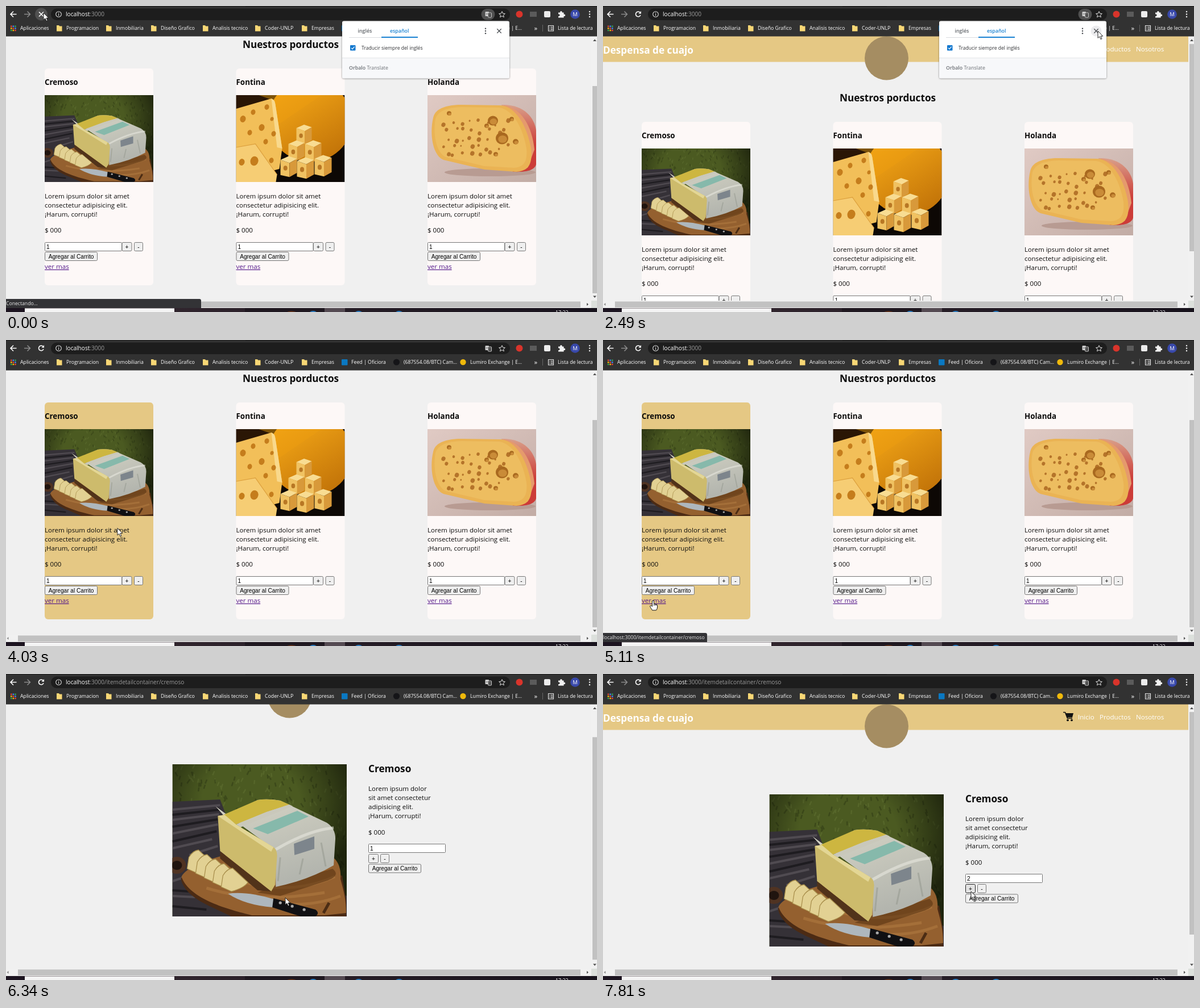
Write an HTML page that moves like this. It is 1039 px wide and 539 px high and loops after 8 s.

```html
<!DOCTYPE html>
<html lang="es">
<head>
<meta charset="utf-8">
<title>Tienda</title>
<style>
html, body { margin: 0; width: 100%; height: 100%; overflow: hidden; background: #f0f0f0; }
svg { display: block; width: 1039px; height: 539px; }
text { font-family: "Open Sans", "Noto Sans", sans-serif; white-space: pre; }
.form { font-family: "Liberation Sans", sans-serif; }
.bold { font-weight: 700; }
.semi { font-weight: 600; }
</style>
</head>
<body>
<svg id="stage" viewBox="0 0 1039 539" xmlns="http://www.w3.org/2000/svg"></svg>
<script>
const LOOP = 8000, TAN = '#e5c884', CARD = '#fdf8f7', INK = '#0c0c0c';
const CARD_X = [68, 404.5, 741];

// ---------- drawing helpers ----------
const rect = (x, y, w, h, fill, more = '') =>
  `<rect x="${x}" y="${y}" width="${w}" height="${h}" fill="${fill}" ${more}/>`;
const text = (x, y, s, size, fill = INK, more = '') =>
  `<text x="${x}" y="${y}" font-size="${size}" fill="${fill}" ${more}>${s}</text>`;
const path = (d, fill, more = '') => `<path d="${d}" fill="${fill}" ${more}/>`;
const line = (d, stroke, w = 1.4, more = '') =>
  `<path d="${d}" fill="none" stroke="${stroke}" stroke-width="${w}" ${more}/>`;
const dot = (x, y, r, fill, more = '') => `<circle cx="${x}" cy="${y}" r="${r}" fill="${fill}" ${more}/>`;
const oval = (x, y, rx, ry, fill, a = 0) =>
  `<ellipse cx="${x}" cy="${y}" rx="${rx}" ry="${ry}" fill="${fill}" transform="rotate(${a} ${x} ${y})"/>`;
const group = (id, body, more = '') => `<g id="${id}" ${more}>${body}</g>`;

function random(seed) {
  return () => (seed = (seed * 16807) % 2147483647) / 2147483647;
}

// ---------- pictures ----------
function creamCheese() {
  const rnd = random(11);
  const strokes = (n, x, y, w, h, dx, dy) => {
    let d = '';
    for (let i = 0; i < n; i++) {
      d += `M${(x + rnd() * w).toFixed(1)} ${(y + rnd() * h).toFixed(1)}l${(dx * (rnd() - .5)).toFixed(1)} ${dy}`;
    }
    return d;
  };
  const slices = [0, 1, 2, 3, 4].map(i => {
    const x = 26 + i * 15, y = 184 + i * 8;
    return path(`M${x} ${y}L${x + 3} ${y - 20}Q${x + 10} ${y - 32} ${x + 20} ${y - 33}L${x + 47} ${y - 8}Q${x + 40} ${y + 2} ${x + 18} ${y + 8}Z`,
      '#e2d193', 'stroke="#a98f4c" stroke-width="1.3" stroke-linejoin="round"');
  }).join('');
  return rect(0, 0, 307, 268, '#4b5a21') +
    line(strokes(160, 0, 0, 307, 190, 10, -7), '#6c7d3a', 2.4, 'opacity=".35"') +
    line(strokes(160, 0, 0, 307, 190, 10, -7), '#26300f', 2.6, 'opacity=".4"') +
    rect(0, 0, 307, 268, 'url(#vignette)') +
    path('M0 66L84 62 110 130 307 232V268H0Z', '#353137') +
    line('M0 80L84 72M0 98L82 88M0 122L80 106M0 148L70 132M30 160L80 144M0 206L18 200M0 232L40 234', '#676167', 4, 'opacity=".55"') +
    line('M0 89L84 80M0 110L80 97M0 136L78 118M0 222L30 224M0 250L60 256', '#151317', 4, 'opacity=".7"') +
    oval(8, 178, 16, 15, '#503322') + oval(8, 178, 9, 8, '#20140f') +
    path('M15 200C18 224 44 240 70 252L104 268H306V240L299 196Z', '#4c2b14') +
    path('M16 198C24 182 56 170 92 160L270 158C288 162 298 178 296 202C302 224 306 240 306 262L268 266H140C100 256 30 238 16 198Z', '#94602f') +
    line('M60 218Q150 246 268 226M120 206Q210 232 286 198M196 246Q250 250 296 232', '#b27c42', 5, 'opacity=".55"') +
    path('M150 226L180 214 282 184Q298 196 270 206L190 232Z', '#54310f', 'opacity=".55"') +
    path('M76 74L92 92 150 63Q168 60 190 64L272 103Q287 113 287 131L284 178Q240 204 182 216V152Z', 'url(#wrap)') +
    path('M90 89L150 63Q166 60 190 64L206 71 166 84 112 106Z', '#cdb640') +
    path('M112 106L166 84 206 71 212 74 172 90 120 111Z', '#c9c8bb') +
    path('M142 113L220 82 240 92 168 123Z', '#86b9ab') +
    line('M182 150Q240 116 284 112', '#e8e8df', 5, 'opacity=".6"') +
    line('M190 164L186 206M262 138L270 180M230 166L224 194', '#92968c', 3, 'opacity=".5"') +
    path('M214 140L250 127V149L215 160Z', '#7d858c') +
    path('M80 91L92 89 112 106 178 146Q186 152 184 166L181 212 174 224 84 153Z', '#cdbb6c') +
    path('M80 91L92 89 112 106 178 146 174 154Z', '#e3d695') +
    path('M84 153L174 224 150 222 84 166Z', '#51331a') + slices +
    path('M98 228Q130 223 180 238L177 252Q128 248 98 228Z', '#aeb7bd') +
    path('M178 236L252 256Q260 262 252 268H226L176 252Z', '#101013') +
    [190, 211, 232].map((x, i) => dot(x, 244 + i * 6, 2.6, '#a9a9a9')).join('') +
    line('M266 262L276 244', '#4b2c14', 5);
}

function fontina() {
  const cube = (x, y, s) =>
    path(`M${x} ${y}l${s * .5} -${s * .22} ${s * .5} ${s * .16} -${s * .45} ${s * .25}Z`, '#f8dc92') +
    path(`M${x} ${y}l${s * .55} ${s * .19}v${s * .85}l-${s * .55} -${s * .12}Z`, '#f0c262') +
    path(`M${x + s * .55} ${y + s * .19}l${s * .45} -${s * .25}v${s * .85}l-${s * .45} ${s * .25}Z`, '#d8993a') +
    oval(x + s * .3, y + s * .5, s * .12, s * .15, '#b87724');
  const holes = [[30, 30, 4], [54, 21, 4], [12, 42, 5], [63, 42, 3], [45, 57, 5], [66, 68, 4], [24, 66, 4], [52, 82, 4], [32, 116, 7], [10, 118, 5], [62, 115, 4]];
  return rect(0, 0, 191, 153, '#0d0805') + oval(130, 45, 74, 72, 'url(#wheel)', 12) +
    path('M40 0H150L62 60Z', '#ee9d10', 'opacity=".5"') +
    path('M0 0H40L62 8 0 24Z', '#2a1605') +
    path('M0 24L62 6Q68 8 69 16L81 94 76 130 0 150Z', '#f2bf59') +
    path('M62 6Q68 8 69 16L81 94 72 92Z', '#f9d98c') +
    path('M0 92L34 86 72 140 70 153H0Z', '#f6cd74') +
    line('M0 92L34 86 72 140', '#dc9f3c', 1.2) +
    holes.map(h => oval(h[0], h[1], h[2], h[2] * 1.2, '#c57d1c', 15)).join('') +
    cube(106, 58, 27) + cube(92, 86, 28) + cube(121, 86, 29) +
    cube(78, 114, 29) + cube(107, 116, 30) + cube(138, 112, 30);
}

function holanda() {
  const rnd = random(29);
  let small = '';
  for (let i = 0; i < 38; i++) {
    const x = 28 + (i % 8) * 15 + rnd() * 10, y = 44 + Math.floor(i / 8) * 14 + rnd() * 10, r = 1.4 + rnd() * 2.4;
    small += oval(x, y, r, r * 1.1, '#b5742a', 20);
  }
  const big = [[115, 45, 9], [131, 76, 11], [104, 54, 4], [148, 42, 4], [155, 82, 5], [120, 104, 4], [38, 32, 4]];
  return rect(0, 0, 191, 153, 'url(#wall)') + oval(110, 136, 80, 7, '#b89b92') +
    path('M130 17C170 16 188 40 191 62V122C188 132 176 136 150 135Z', 'url(#rind)') +
    path('M134 18C164 22 184 54 188 96L176 128 150 120Z', '#e59a6c') +
    path('M10 40C13 24 32 17 60 17L128 18C158 20 176 60 182 94C185 121 178 134 156 135L100 131 28 114C10 107 3 70 10 40Z', '#eab354') +
    path('M14 42C18 28 34 22 60 21L126 22C152 26 168 60 174 94C176 116 170 127 152 128L100 125 32 109C16 102 9 70 14 42Z', '#edbd60') +
    small + big.map(h => oval(h[0], h[1], h[2], h[2] * .95, '#a9691f') +
      oval(h[0] + 1, h[1] + 1.5, h[2] * .7, h[2] * .6, '#c98b38')).join('');
}

const picture = (id, x, y, w, h) => `<use href="#${id}" x="${x}" y="${y}" width="${w}" height="${h}"/>`;
const symbol = (id, w, h, body) =>
  `<symbol id="${id}" viewBox="0 0 ${w} ${h}" preserveAspectRatio="none">${body}</symbol>`;
const gradient = (id, from, to, dir) =>
  `<linearGradient id="${id}" x1="0" y1="0" ${dir}><stop stop-color="${from}"/><stop offset="1" stop-color="${to}"/></linearGradient>`;

const defs = `<defs>
  <radialGradient id="vignette" cx=".45" cy=".25" r=".62"><stop offset=".45" stop-opacity="0"/><stop offset="1" stop-opacity=".6"/></radialGradient>
  ${gradient('wrap', '#d6d5c6', '#b3b5ae', 'x2=".4" y2="1"')}
  ${gradient('wheel', '#ffb31a', '#b96a06', 'x2="1" y2="1"')}
  ${gradient('rind', '#d9a08a', '#cc3c38', 'x2="0" y2=".6"')}
  ${gradient('wall', '#e0cac4', '#c2aca5', 'x2="1" y2="1"')}
  ${gradient('bar', '#3a2c34', '#17121c', 'x2="1" y2="0"')}
  ${symbol('pic0', 307, 268, creamCheese())}
  ${symbol('pic1', 191, 153, fontina())}
  ${symbol('pic2', 191, 153, holanda())}
  <filter id="shade" x="-5%" y="-10%" width="110%" height="125%"><feDropShadow dx="0" dy="1" stdDeviation="1.6" flood-opacity=".45"/></filter>
</defs>`;

// ---------- page ----------
const button = (x, y, w, label, id = '') =>
  rect(x + .5, y + .5, w - 1, 15, '#efefef', `rx="2" stroke="#767676" ${id && `id="${id}"`}`) +
  text(x + w / 2, y + 11.6, label, 10.1, '#000', 'class="form" text-anchor="middle"');
const field = (x, y, id = '') =>
  rect(x + .5, y + .5, 135, 15, '#fff', 'stroke="#767676" rx="1"') +
  text(x + 3, y + 11.8, '1', 10.1, '#000', `class="form" ${id && `id="${id}"`}`);
const lines = (x, y, list) => list.map((s, i) => text(x, y + i * 16, s, 11.55)).join('');

const card = (x, name, i) =>
  rect(x, 204, 191, 382, CARD, `rx="6" id="card${i}"`) +
  text(x, 233, name, 13.4, INK, 'class="bold"') + picture('pic' + i, x, 251, 191, 153) +
  lines(x, 433, ['Lorem ipsum dolor sit amet', 'consectetur adipisicing elit.', '¡Harum, corrupti!']) +
  text(x, 493, '$ 000', 11.55) + field(x, 510) +
  button(x + 135.5, 510, 18, '+') + button(x + 157, 510, 16, '-') +
  button(x, 527, 93, 'Agregar al Carrito') +
  text(x, 557, 'ver mas', 11.55, '#551a8b', 'text-decoration="underline"');

const title = (x) => text(x, 168, 'Nuestros porductos', 17.2, INK, 'class="bold" text-anchor="middle"');

const cart = line('M809 67.5h3.5l4 10.5h8.5', '#111', 1.7) +
  path('M813 69h14l-2 7.5h-9.5Z', '#111') + dot(817, 81.3, 1.9, '#111') + dot(824, 81.3, 1.9, '#111');

const page = rect(0, 53, 1039, 480, '#f0f0f0') + group('scroller',
  rect(0, 53, 1039, 45.5, TAN) +
  text(159, 84, 'Despensa de cuajo', 17.2, '#fff', 'class="bold" text-anchor="end"') +
  group('nav', cart + [['Inicio', 835], ['Productos', 873], ['Nosotros', 937]]
    .map(n => text(n[1], 80, n[0], 11.6, '#fff')).join('')) +
  group('badge', dot(498.5, 92, 38.5, '#a58d62')) +
  group('waiting', title(507) + text(507, 214, 'trayendo productos', 11.55, INK, 'text-anchor="middle"')) +
  group('list', title(500.5) + ['Cremoso', 'Fontina', 'Holanda'].map((n, i) => card(CARD_X[i], n, i)).join('')) +
  group('detail', picture('pic0', 292.5, 212, 306.5, 268) +
    text(637, 226, 'Cremoso', 17.2, INK, 'class="bold"') +
    lines(637, 259, ['Lorem ipsum dolor', 'sit amet consectetur', 'adipisicing elit.', '¡Harum, corrupti!']) +
    text(637, 335.5, '$ 000', 11.55) + field(637, 352, 'amount') +
    button(637, 370, 18, '+', 'plus') + button(658, 370, 16, '-') +
    button(637, 387.5, 93, 'Agregar al Carrito')));

const scrollbars = rect(0, 519, 1039, 13, '#f1f1f1') + rect(21, 520.5, 989, 10.5, '#c1c1c1', 'id="hthumb"') +
  path('M4.5 523v5l-3 -2.5Z', '#8a8a8a') + group('harrow', path('M1021 523v5l3 -2.5Z', '#505050')) +
  group('vbar', rect(1029, 53, 10, 466, '#f1f1f1') + rect(1029, 519, 10, 13, '#dce0dc') +
    rect(1031, 67, 8, 365, '#c1c1c1', 'id="vthumb"') +
    path('M1032 62h6l-3 -3.5Z', '#505050') + path('M1032 510.5h6l-3 3.5Z', '#505050'));

// ---------- browser frame ----------
const folder = x => path(`M${x} 34h4l1.2 1.4h4.3v9h-9.5Z`, '#f8d775');
const mark = (x, s) => text(x, 42.3, s, 8.75, '#fff');
const bookmarks = [[106, 'Programacion'], [193, 'Inmobiliaria'], [272, 'Diseño Grafico'], [363, 'Analisis tecnico'], [455, 'Coder-UNLP'], [537, 'Empresas']];
const hues = ['#ea4335', '#fbbc04', '#34a853', '#4285f4'];
let apps = '';
for (let i = 0; i < 9; i++) apps += rect(8 + (i % 3) * 3.6, 34.5 + Math.floor(i / 3) * 3.6, 2.5, 2.5, hues[(i * 3) % 4]);

const chrome = rect(0, 0, 1039, 53.5, '#323232') + rect(0, 0, 1039, 1, '#1b1b1b') + rect(421, 0, 78, 1, '#111') +
  line('M18.5 14.5H8.5M13 9.5L8 14.5L13 19.5', '#fff', 1.6) +
  line('M32 14.5H42M37.5 9.5L42.5 14.5L37.5 19.5', '#8b8b8b', 1.5) +
  dot(62, 14.5, 11, '#505050', 'id="halo"') +
  line('M58 10.5l8 8M66 10.5l-8 8', '#fff', 1.6, 'id="stop"') +
  group('reload', line('M66 16A4.4 4.4 0 1 1 65 11.2', '#fff', 1.6) + path('M67 9v4.6h-4.6Z', '#fff')) +
  rect(79, 4.5, 807, 20.5, '#1d1d1d', 'rx="10.2"') +
  dot(92.5, 14.5, 4.8, 'none', 'stroke="#ddd" stroke-width="1.1"') + rect(92, 13.8, 1.1, 3.4, '#ddd') + rect(92, 11.6, 1.1, 1.2, '#ddd') +
  text(105, 18, 'localhost<tspan fill="#9a9a9a" id="tail">:3000</tspan>', 10.1, '#fff') +
  rect(835.5, 5, 24, 19.5, '#505050', 'rx="9.7" id="pill"') +
  rect(842.5, 10, 6.5, 8, '#ccc', 'rx="1"') + rect(847.5, 12, 6, 8, '#444', 'rx="1" stroke="#ccc"') +
  line('M844 14h3.5M849 15h3.5M850.7 14v4', '#666', 1) +
  line('M872 9.6l1.6 3.5 3.8 .4-2.9 2.5.9 3.7-3.4-2-3.4 2 .9-3.7-2.9-2.5 3.8-.4Z', '#e0e0e0', 1) +
  dot(902.5, 14.5, 6, '#d9342b') + rect(921, 10, 12, 9, '#5b5b5b') + rect(946, 9, 11, 11, '#ececec', 'rx="2"') +
  path('M971 11.5h3.2a1.8 1.8 0 1 1 3.4 0h3v3.2a1.8 1.8 0 1 1 0 3.2v2.6h-9.6v-2.8a1.8 1.8 0 1 0 0 -3.2Z', '#f2f2f2') +
  dot(1000.5, 14.5, 8.3, '#3949ab') + text(1000.5, 18, 'M', 9.5, '#fff', 'text-anchor="middle"') +
  [10, 14.5, 19].map(y => dot(1026, y, 1.25, '#eee')).join('') +
  apps + mark(25, 'Aplicaciones') + bookmarks.map(b => folder(b[0] - 17) + mark(...b)).join('') +
  rect(590, 34, 10.5, 10.5, '#0a78c2', 'rx="1"') + mark(607, 'Feed | Oficiora') +
  dot(686.5, 39, 5.6, '#151518') + mark(699, '(687554.08/BTC) Cam...') +
  dot(803.5, 39, 5.2, '#f0b90b') + mark(816, 'Lumiro Exchange | E...') +
  text(928.5, 42.5, '»', 11.5, '#fff') + rect(943, 33, 1, 12, '#666') +
  line('M953.5 34.5h9v9.5h-9ZM955 37h1M957.5 37h4M955 39.3h1M957.5 39.3h4M955 41.6h1M957.5 41.6h4', '#e6e6e6', 1.1) +
  mark(970, 'Lista de lectura');

const popup = group('popup',
  rect(591, 26.5, 294, 100.5, '#fff', 'rx="3" filter="url(#shade)"') +
  path('M591 91.5h294v33a3 3 0 0 1 -3 3h-288a3 3 0 0 1 -3 -3Z', '#f7f8fa') + rect(591, 91, 294, 1, '#e3e5e8') +
  rect(603, 55, 57, 1, '#dadce0') + rect(660, 54, 64, 2, '#1a82d2') +
  text(618.5, 47, 'inglés', 8.8, '#5f6368', 'class="semi"') + text(675, 47, 'español', 8.8, '#1a82d2', 'class="semi"') +
  [39.8, 44, 48.2].map(y => dot(843, y, 1.2, '#4a4d51')).join('') +
  dot(867, 44, 9.5, '#ececee', 'id="closeHalo"') + line('M863.3 40.3l7.4 7.4M870.7 40.3l-7.4 7.4', '#4a4d51', 1.3) +
  rect(605, 69, 9.5, 9.5, '#1479cf', 'rx="1"') + line('M607 73.8l2 2 3.6 -4.2', '#fff', 1.2) +
  text(625, 76.8, 'Traducir siempre del inglés', 8.6, '#303134') +
  text(603, 112.3, '<tspan class="semi">Orbalo</tspan> Translate', 8.8, '#6b6f74'));

const status = group('status', path('M0 516H340Q343 516 343 519V532H0Z', '#333336', 'id="bubble"') +
  text(0, 527, 'Conectando...', 8.66, '#e8e8e8', 'id="note"'));

const taskbar = rect(0, 532, 1039, 7, 'url(#bar)') + rect(0, 532, 33, 7, '#1c1420') + rect(33, 532.5, 263, 6.5, '#f4f4f4') +
  rect(420, 532, 140, 7, '#1f1820') + rect(560, 532, 36, 7, '#544a52') +
  [540, 620, 691].map(x => oval(x, 540, 6, 3, '#2a7cc0')).join('') + oval(502, 540, 8, 2.5, '#6b3518') +
  text(966, 543, '17:22', 8.8, '#fff');

const pointer = group('pointer',
  path('M0 0V12.4L2.9 9.8L5 14.6L7 13.7L5 9.1H8.8Z', '#fff', 'id="arrow" stroke="#111" stroke-width=".9"') +
  group('hand', path('M-1.5 1C-1.5 -.5 1.5 -.5 1.5 1V5.5L6 6.8Q7.6 7.2 7.6 9V12Q7.4 14.5 5.6 17H-1.4C-2.6 14.6 -4.6 12.4 -5.4 9.8C-5 8.2 -3 8.6 -1.5 10.4Z', '#fff', 'stroke="#111" stroke-width="1"') +
    line('M1.5 5.5V9M3.6 6.2V9M5.6 6.8V9', '#111', .8)));

document.getElementById('stage').innerHTML = defs + page + scrollbars + chrome + popup + status + taskbar + pointer;

// ---------- timing ----------
const ease = {
  both: p => p * p * (3 - 2 * p),
  in: p => p * p,
  out: p => 1 - (1 - p) * (1 - p),
  jump: p => p < 1 ? 0 : 1
};
// time, x, y, easing towards this point
const MOVES = [
  [0, 66, 12], [1480, 68, 13, 'jump'], [1540, 68, 13, 'jump'], [2280, 849, 44, 'both'], [2490, 870, 44, 'out'],
  [2790, 870, 44, 'jump'], [3560, 201, 325, 'both'], [3930, 201, 325, 'jump'], [4710, 91, 464, 'both'],
  [4910, 88, 459, 'out'], [5270, 88, 459, 'jump'], [5870, 289, 408, 'in'], [6140, 491, 394, 'out'],
  [6420, 491, 394, 'jump'], [7120, 718, 394, 'both'], [7470, 647, 383, 'out'], [LOOP, 647, 383, 'jump']
];
const SCROLLS = [[0, 94], [70, 0], [3630, 17.5], [3700, 66], [3770, 94], [5250, 56], [6340, 53], [6410, 22], [6480, 0]];
const VIEWS = [[0, 'list'], [70, 'waiting'], [2110, 'list'], [5250, 'detail']];

const current = (table, t) => table.filter(row => row[0] <= t).pop()[1];

function cursorAt(t) {
  const i = MOVES.findIndex(m => m[0] > t), a = MOVES[i - 1], b = MOVES[i];
  const p = ease[b[3]]((t - a[0]) / (b[0] - a[0]));
  return [a[1] + (b[1] - a[1]) * p, a[2] + (b[2] - a[2]) * p];
}

const el = {};
document.querySelectorAll('#stage [id]').forEach(n => el[n.id] = n);
const set = (id, name, value) => el[id].setAttribute(name, value);
const show = (id, on) => set(id, 'visibility', on ? 'visible' : 'hidden');
const inside = (x, y, left, top, w, h) => x >= left && x <= left + w && y >= top && y <= top + h;

function draw(t) {
  const [x, y] = cursorAt(t), view = current(VIEWS, t), scroll = current(SCROLLS, t);
  const wide = view === 'waiting', detail = view === 'detail', open = t < 2770;

  for (const v of ['waiting', 'list', 'detail']) set(v, 'display', v === view ? 'inline' : 'none');
  set('scroller', 'transform', `translate(0 ${-scroll})`);
  set('nav', 'transform', `translate(${wide ? 13 : 0} 0)`);
  set('badge', 'transform', `translate(${wide ? 7 : 0} 0)`);

  show('vbar', !wide);
  set('hthumb', 'width', wide ? 1002 : 989);
  set('harrow', 'transform', `translate(${wide ? 13 : 0} 0)`);
  set('vthumb', 'height', detail ? 392 : 365);
  set('vthumb', 'y', 67 + scroll * (detail ? .835 : .787));

  CARD_X.forEach((left, i) => {
    const over = view === 'list' && y > 53 && inside(x, y + scroll, left, 204, 191, 382);
    set('card' + i, 'fill', over ? TAN : CARD);
  });

  const loading = t < 410;
  show('stop', loading);
  show('reload', !loading);
  show('halo', Math.hypot(x - 62, y - 14.5) < 11);
  show('pill', open);
  show('popup', open);
  show('closeHalo', open && Math.hypot(x - 867, y - 44) < 9.5);
  el.tail.textContent = detail ? ':3000/itemdetailcontainer/cremoso' : ':3000';

  const link = t >= 5110;
  set('status', 'opacity', link ? (t < 5320 ? 1 : 0) : Math.max(0, Math.min(1, (550 - t) / 210)));
  set('bubble', 'd', `M0 516H${link ? 180 : 340}q3 0 3 3V532H0Z`);
  el.note.textContent = link ? 'localhost:3000/itemdetailcontainer/cremoso' : 'Conectando...';

  const overPlus = detail && inside(x, y + scroll, 637, 370, 18, 16);
  set('plus', 'fill', overPlus ? '#e3e3e3' : '#efefef');
  set('plus', 'stroke', t >= 7670 ? '#222' : '#767676');
  el.amount.textContent = t >= 7740 ? '2' : '1';

  const onLink = view === 'list' && inside(x, y + scroll, 68, 546, 42, 14);
  show('hand', onLink);
  show('arrow', !onLink);
  set('pointer', 'transform', `translate(${x.toFixed(2)} ${y.toFixed(2)})`);
}

const start = performance.now();
function tick() {
  draw((performance.now() - start) % LOOP);
  requestAnimationFrame(tick);
}
tick();
</script>
</body>
</html>
```
